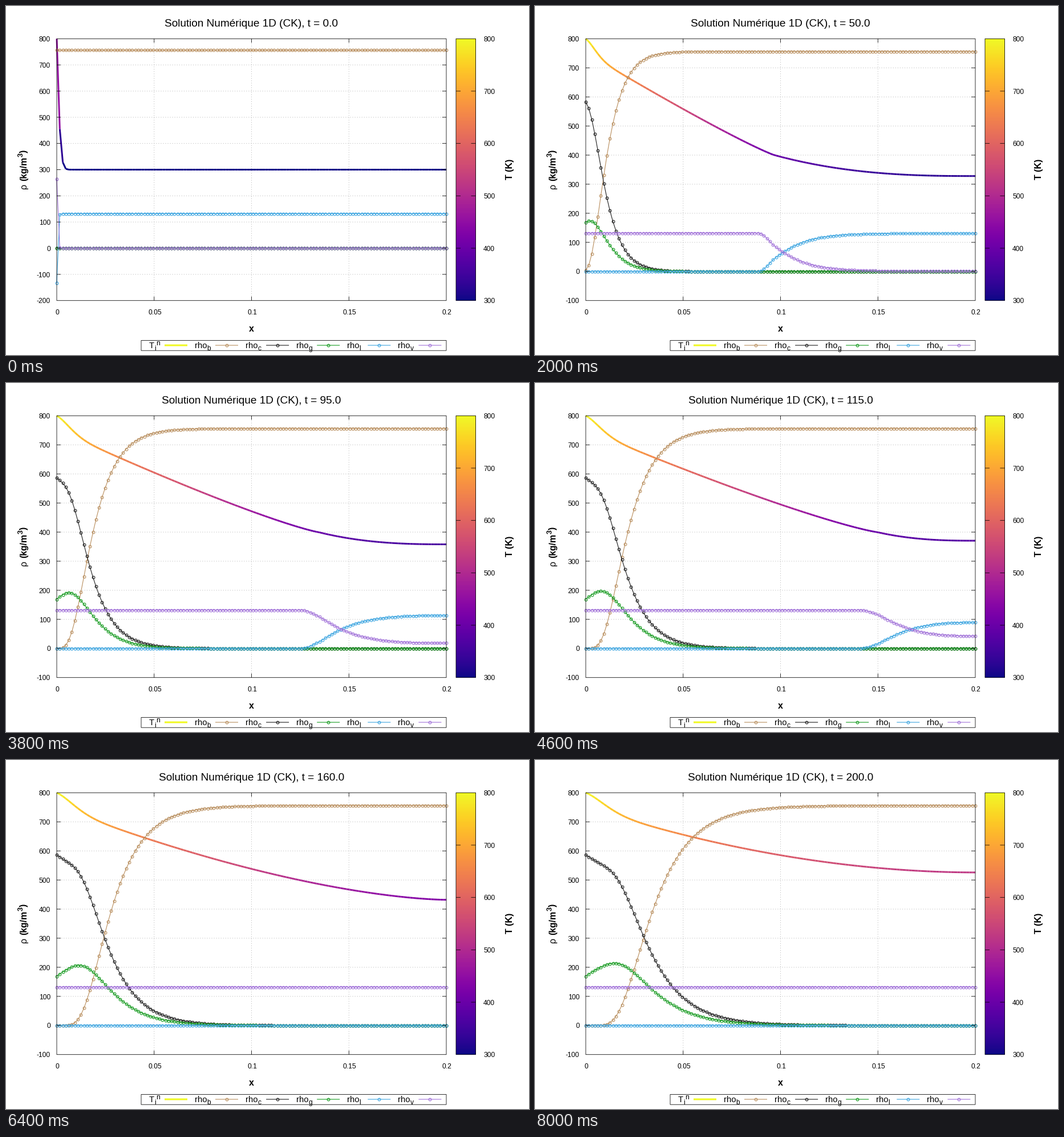
A matplotlib script that plays this animation: 917 px wide and 611 px high, repeating every 8.2 s.

```python
import numpy as np
import matplotlib.pyplot as plt
from matplotlib.animation import FuncAnimation
from matplotlib.collections import LineCollection
from matplotlib.patches import Rectangle

plt.rcParams["path.snap"] = False

W, H, DPI = 917, 611, 100
PX = 72 / DPI
LEFT, RIGHT, TOP, BOTTOM = 89, 772, 57.3, 515.7
BAR_LEFT, BAR_RIGHT = 789, 823.5
N, LENGTH = 129, 0.2
WOOD, WATER = 756, 132
HOT, BOIL, CHAR = 800, 400, 752
COLORS = ["#b88d5c", "#1c1c1c", "#159a1f", "#3aa4e0", "#a070d8"]
plasma = plt.get_cmap("plasma")

idx = np.arange(N + 1)
xs = LENGTH * idx / N
px = LEFT + (RIGHT - LEFT) * idx / N


def back_wall(t):
    """Temperature at the far end of the slab."""
    return np.interp(t, [0, 15, 30, 50, 95, 140, 155, 180, 200],
                     [300, 301, 307, 328, 358, 386, 418, 488, 526])


def temperature(t):
    if t == 0:
        return 300 + 500 * np.exp(-.9 * idx - .27 * idx ** 2)
    end = back_wall(t)
    if end < BOIL:
        # dry zone down to the boiling front, then a tail to the wall
        front = .075 * np.sqrt(t / 30) * (1 + .06 * (t / 140) ** 6)
        dry = np.clip(1 - xs / front, 0, 1) ** (1.05 * (t / 30) ** .09)
        wet = np.clip((LENGTH - xs) / (LENGTH - front), 0, 1) ** 2.6
        temp = np.where(xs < front, BOIL + (CHAR - BOIL) * dry,
                        end + (BOIL - end) * wet)
    else:
        power = 1.48 + .0085 * (t - 147)
        temp = end + (CHAR - end) * (1 - xs / LENGTH) ** power
    skin = np.exp(-(xs / (.00098 * np.sqrt(t))) ** 1.7)
    return temp + (HOT - CHAR) * skin


def densities(t, temp):
    """rho_b, rho_c, rho_g, rho_l and rho_v along the slab."""
    if t == 0:
        zero = np.zeros(N + 1)
        v = 2 * WATER * np.exp(-4.5 * idx)
        return zero + WOOD, zero, zero, WATER - v, v
    age = max(t, 30) / 30

    # pyrolysis: accumulated decay as a function of x / sqrt(t)
    xi = idx / np.sqrt(t)
    slope = 1.62 - .26 * (t / 200) ** 2.8
    bend = .38 * age ** .74 * (1 - np.exp(-xi / (.33 * age ** .45)))
    b = WOOD * np.exp(-.105 * t * np.exp(-slope * xi - bend))
    share = .63 + .146 * np.exp(-idx / (9.5 * (t / 30) ** .24))
    c = share * (WOOD - b)

    # drying: vapour fades where it is cooler than the front
    start = 430 - 14 * np.log(age)
    v = WATER * np.exp(-.66 * (np.maximum(start - temp, 0) / 30) ** 1.75)
    return b, c, WOOD - b - c, WATER - v, v


def y_px(value, low):
    return BOTTOM - (value - low) * (BOTTOM - TOP) / (800 - low)


fig = plt.figure(figsize=(W / DPI, H / DPI), dpi=DPI, facecolor="white")
ax = fig.add_axes([0, 0, 1, 1])
ax.axis("off")


def text(x, y, s, size=12, **kw):
    kw = {"ha": "left", "va": "baseline", "family": "Liberation Sans",
          "rotation_mode": "anchor", "zorder": 6, **kw}
    return ax.text(x, y, s, fontsize=size * PX, **kw)


def line(x, y, color="black", width=1.1, **kw):
    kw = {"solid_capstyle": "butt", **kw}
    return ax.plot(x, y, color=color, lw=width * PX, **kw)[0]


def marked(x, y, color, **kw):
    return line(x, y, color, marker="o", ms=4.7 * PX, mfc="none",
                mew=1.1 * PX, **kw)


def grid(x, y):
    return line(x, y, "#bcbcbc", .9, dashes=(1.5, 3), zorder=1)


def tick(x, y):
    return line(x, y, width=.8, zorder=5)


def side_ticks(y, x0, x1, size):
    return [tick([x0, x0 + size], [y, y]), tick([x1 - size, x1], [y, y])]


def frame_box(x0, y0, x1, y1):
    ax.add_patch(Rectangle((x0, y0), x1 - x0, y1 - y0, fill=False,
                           ec="black", lw=.8 * PX, zorder=5))


def y_axis(low):
    parts = []
    for value in range(low, 801, 100):
        y = y_px(value, low)
        parts.append(text(78, y + 4.7, str(value), ha="right"))
        if low < value < 800:
            parts.append(grid([LEFT, RIGHT], [y, y]))
            parts += side_ticks(y, LEFT, RIGHT, 7)
    return parts


axes_by_low = {low: y_axis(low) for low in (-200, -100)}

for k in range(5):
    x = LEFT + k / 4 * (RIGHT - LEFT)
    text(x + 1.3, 539.6, f"{k * .05:g}", ha="center")
    if 0 < k < 4:
        grid([x, x], [TOP, BOTTOM])
        tick([x, x], [TOP, TOP + 7])
        tick([x, x], [BOTTOM - 7, BOTTOM])
frame_box(LEFT, TOP, RIGHT, BOTTOM)

# Colour scale
ax.imshow(np.linspace(1, 0, 256)[:, None], cmap=plasma, aspect="auto",
          extent=(BAR_LEFT, BAR_RIGHT, BOTTOM, TOP), zorder=1)
frame_box(BAR_LEFT, TOP, BAR_RIGHT, BOTTOM)
for value in range(300, 801, 100):
    y = y_px(value, 300)
    text(837, y + 4.7, str(value))
    if 300 < value < 800:
        side_ticks(y, BAR_LEFT, BAR_RIGHT, 8)

# Labels
title = text(430.5, 36.4, "", 18.95, ha="center")
text(430.5, 569.8, "x", 16, ha="center", weight="bold")
text(888, 304, "T (K)", 16, rotation=90, weight="bold")
text(36, 320, "ρ", 16, rotation=90)
text(36, 305.5, "(kg/m", 15.8, rotation=90, weight="bold")
text(29.5, 264, "3", 12.5, rotation=90, weight="bold")
text(36, 257.2, ")", 15.8, rotation=90, weight="bold")

# Legend
frame_box(237, 585.5, RIGHT, 603.2)
text(251, 599.4, "T", 14.7)
text(260, 603, "i", 12)
text(263, 594.5, "n", 12)
line([278, 318], [594, 594], plasma(1.0), 3)
for k, (sub, color) in enumerate(zip("bcglv", COLORS)):
    x = 387 + 89.1 * k
    text(x - 56, 599.4, "rho", 14.7)
    text(x - 34.8, 602.8, sub, 12)
    line([x - 20, x + 20], [594, 594], color)
    marked([x], [594], color)

heat = LineCollection([], linewidths=3 * PX, zorder=2, capstyle="butt")
ax.add_collection(heat, autolim=False)
curves = [marked(px, px, color, zorder=3 + k / 10)
          for k, color in enumerate(COLORS)]

ax.set_xlim(0, W)
ax.set_ylim(H, 0)


def update(frame):
    t = 5 * frame
    low = -200 if t == 0 else -100
    for key, parts in axes_by_low.items():
        for part in parts:
            part.set_visible(key == low)
    title.set_text(f"Solution Numérique 1D (CK), t = {t:.1f}")
    temp = temperature(t)
    pts = np.column_stack([px, y_px(temp, low)])
    heat.set_segments(np.stack([pts[:-1], pts[1:]], axis=1))
    heat.set_color(plasma((temp[1:] - 300) / 500))
    for artist, rho in zip(curves, densities(t, temp)):
        artist.set_data(px, y_px(rho, low))
    return [title, heat, *curves]


anim = FuncAnimation(fig, update, frames=41, interval=200, repeat=True,
                     repeat_delay=0, blit=False)
plt.show()
```
